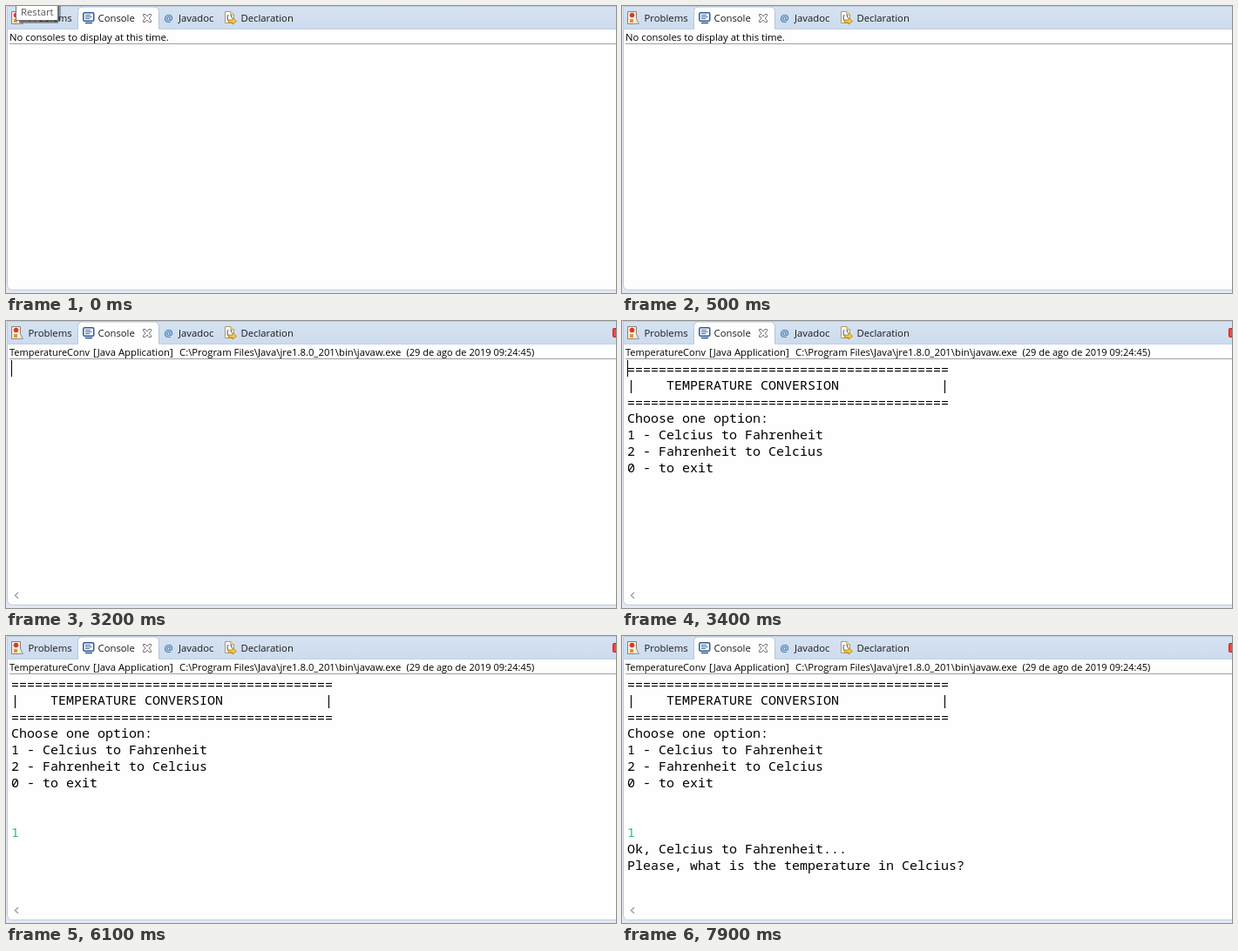
An HTML page that plays this animation: 700x330 px, repeating every 8000 ms.

```html
<!DOCTYPE html>
<html lang="en">
<head>
<meta charset="utf-8">
<title>Console view</title>
<style>
html, body { margin: 0; width: 100%; height: 100%; overflow: hidden; background: #e3e8f1; }
svg { display: block; width: 700px; height: 330px; }
text { white-space: pre; }
.ui { font: 11.3px "Open Sans", "Noto Sans", sans-serif; fill: #000; }
.tab { fill: #1a1a1a; }
.head { font-size: 11px; }
.mono { font: 15px "Noto Sans Mono", "DejaVu Sans Mono", monospace; fill: #000; }
.caret { fill: #000; }
.anim { animation: 8s step-end infinite; }

.tip { animation-name: tip; }
.stop { animation-name: stop; }
.idle { animation-name: idle; }
.run { animation-name: run; }
.menu { animation-name: menu; }
.input { animation-name: input; }
.reply { animation-name: reply; }
.caret1 { animation-name: caret1; }
.caret2 { animation-name: caret2; }
.caret3 { animation-name: caret3; }

@keyframes tip {
  0% { opacity: 1; }
  3.75% { opacity: .66; }
  5% { opacity: .33; }
  6.25%, 100% { opacity: 0; }
}
@keyframes stop { 0% { opacity: 0; } 38.75%, 100% { opacity: 1; } }
@keyframes idle { 0% { opacity: 1; } 40%, 100% { opacity: 0; } }
@keyframes run { 0% { opacity: 0; } 40%, 100% { opacity: 1; } }
@keyframes menu { 0% { opacity: 0; } 42.5%, 100% { opacity: 1; } }
@keyframes input { 0% { opacity: 0; } 70%, 100% { opacity: 1; } }
@keyframes reply { 0% { opacity: 0; } 78.75%, 100% { opacity: 1; } }
@keyframes caret1 {
  0%, 48.75%, 61.25%, 70%, 100% { opacity: 0; }
  40%, 55%, 67.5% { opacity: 1; }
}
@keyframes caret2 {
  0%, 76.25%, 100% { opacity: 0; }
  70% { opacity: 1; }
}
@keyframes caret3 {
  0%, 85%, 98.75%, 100% { opacity: 0; }
  78.75%, 91.25% { opacity: 1; }
}
</style>
</head>
<body>
<svg viewBox="0 0 700 330">
  <defs>
    <linearGradient id="bar" x2="0" y2="1">
      <stop stop-color="#d5e2f1"/>
      <stop offset="1" stop-color="#cddcee"/>
    </linearGradient>
    <g id="page">
      <path d="M.5 .5H7L10.5 4V13.5H.5Z" fill="#fffdf2" stroke="#b39a5c"/>
      <path d="M7 .5V4H10.5" fill="#f0dfae" stroke="#b39a5c"/>
    </g>
  </defs>

  <!-- view frame -->
  <path d="M710 .5H1.5V320.500q0 6 6 6H710Z" fill="#fefefe" stroke="#c0cadb"/>
  <rect x="2" y="1" width="698" height="25" fill="url(#bar)"/>
  <path d="M2 26.500H700" stroke="#c3d0e3"/>
  <path d="M82.500 27V6.500q0-5.500 5.500-5.500H170q5.500 0 5.500 5.500V27Z" fill="#fefefe"/>
  <path d="M82.500 26.500V6.500q0-5.500 5.500-5.500H170q5.500 0 5.500 5.500V26.500" fill="none" stroke="#b7c5da"/>
  <path d="M4 43.500H700" stroke="#a0a0a0"/>

  <!-- tab icons -->
  <g transform="translate(6 6)">
    <path d="M.5 .5H10.500V14.500H.5Z" fill="#f7f1e2" stroke="#8e7f68"/>
    <path d="M10.500 8.500L13.500 14.500H8" fill="#f3e3b4" stroke="#8795b3"/>
    <circle cx="5.500" cy="4.500" r="2.800" fill="#d8382f"/>
    <rect x="3" y="9" width="4" height="4" fill="#e0913a"/>
  </g>
  <g transform="translate(88 7)">
    <rect x=".75" y=".75" width="12" height="9.500" rx="1.500" fill="#f4f8fd" stroke="#2f5b94" stroke-width="1.500"/>
    <path d="M3 3.500H9M3 5.500H10.500M3 7.500H8" stroke="#4a6ea5"/>
    <path d="M3 12.500H11" stroke="#2f5b94" stroke-width="1.600"/>
  </g>
  <path d="M157.500 9.500h2.500l2 2.500 2-2.500h2.500v2l-2.500 2.500 2.500 2.500v2h-2.500l-2-2.500-2 2.500h-2.500v-2l2.500-2.500-2.500-2.500Z" fill="#fff" stroke="#777"/>
  <text class="ui" x="181.500" y="17.500" style="fill:#2d6ca8;font-weight:600">@</text>
  <g transform="translate(251 6)">
    <use href="#page"/>
    <path d="M4.500 4.500H3.500V7L2.500 7.500L3.500 8V10.500H4.500M6.500 4.500H7.500V7L8.500 7.500" fill="none" stroke="#4a6ea5"/>
    <path d="M4.500 10H9V7.500L13.500 11.500L9 15V13H4.500Z" fill="#f6cb4c" stroke="#b98a1f"/>
  </g>

  <g class="ui tab">
    <text x="25.500" y="18">Problems</text>
    <text x="105.500" y="18">Console</text>
    <text x="198" y="18">Javadoc</text>
    <text x="269.500" y="18">Declaration</text>
  </g>

  <!-- terminate button, cut by the right edge -->
  <rect class="anim stop" x="696.500" y="8.500" width="10" height="10" rx="1" fill="#f0483e" stroke="#c5221f"/>

  <text class="ui anim idle" x="4" y="40">No consoles to display at this time.</text>
  <g class="anim run">
    <g class="ui">
      <text class="head" x="4" y="40">TemperatureConv</text>
      <text x="100" y="40">[Java Application]</text>
      <text x="199" y="40">C:\Program Files\Java\jre1.8.0_201\bin\javaw.exe</text>
      <text class="head" x="459.500" y="40">(29 de ago de 2019 09:24:45)</text>
    </g>
    <path d="M14 312L10.500 315.500L14 319" fill="none" stroke="#a3a3a3" stroke-width="1.500"/>
  </g>

  <g class="mono anim menu">
    <text x="6" y="61">=========================================</text>
    <text x="6" y="79">|    TEMPERATURE CONVERSION             |</text>
    <text x="6" y="99">=========================================</text>
    <text x="6" y="117">Choose one option:</text>
    <text x="6" y="136">1 - Celcius to Fahrenheit</text>
    <text x="6" y="155">2 - Fahrenheit to Celcius</text>
    <text x="6" y="174">0 - to exit</text>
  </g>
  <text class="mono anim input" x="6" y="231" style="fill:#1fc07c">1</text>
  <g class="mono anim reply">
    <text x="6" y="250">Ok, Celcius to Fahrenheit...</text>
    <text x="6" y="269">Please, what is the temperature in Celcius?</text>
  </g>

  <g class="caret">
    <rect class="anim caret1" x="6" y="45" width="1" height="19"/>
    <rect class="anim caret2" x="15" y="216" width="1" height="19"/>
    <rect class="anim caret3" x="6" y="235" width="1" height="19"/>
  </g>

  <!-- tooltip -->
  <g class="anim tip">
    <path d="M15 17H63V0H60V20H15Z" fill="#000" opacity=".3"/>
    <path d="M15 17H61V0H60V18.500H15Z" fill="#000" opacity=".3"/>
    <path d="M11.500-2V16.500H59.500V-2Z" fill="#fff" stroke="#767676"/>
    <text class="ui" x="17" y="11" style="fill:#575757">Restart</text>
  </g>
</svg>
</body>
</html>
```
